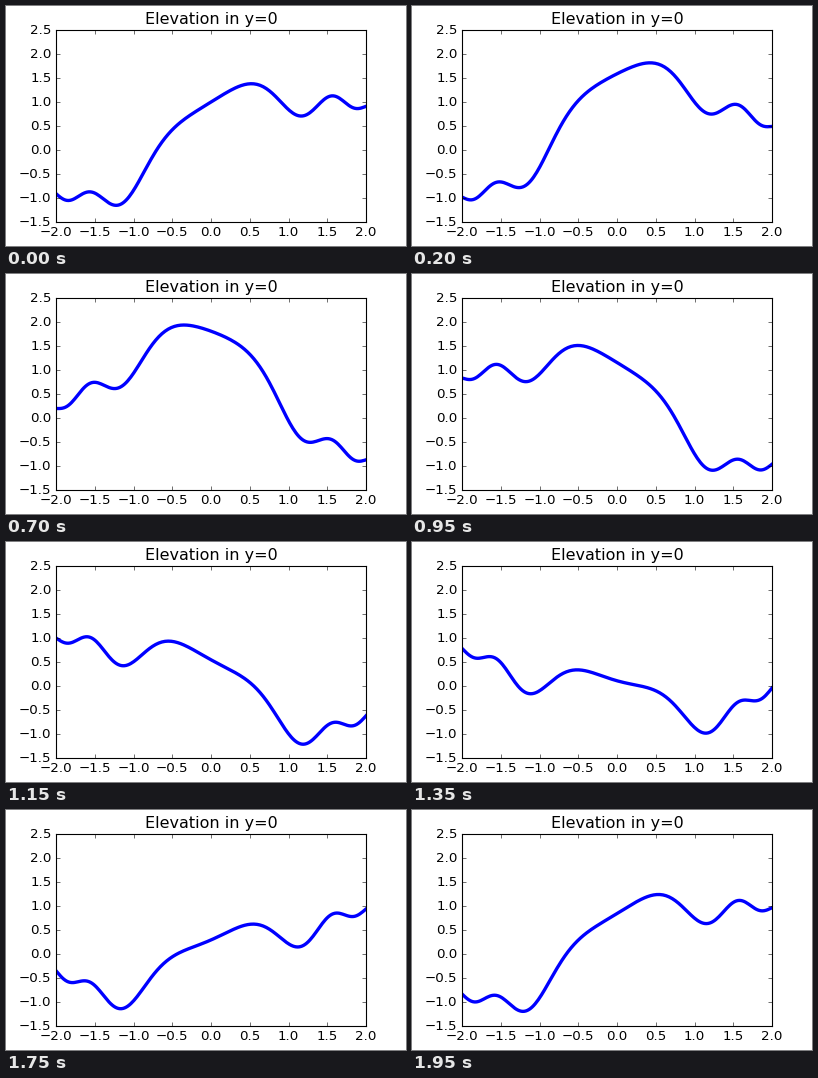
A matplotlib script for the animation above (2000 ms loop, 400 by 240 pixels).

```python
import matplotlib.pyplot as plt
import numpy as np
from matplotlib.animation import FuncAnimation

FRAMES = 40
INTERVAL = 50  # ms

plt.style.use("classic")
plt.rcParams["font.family"] = "DejaVu Sans"

x = np.linspace(-2, 2, 200)


def elevation(x, t):
    """Travelling sine wave over a fixed sinc bump."""
    return np.sin(x + t) + np.sinc(x**2)


fig, ax = plt.subplots(figsize=(5, 3), dpi=80, facecolor="white")
ax.set_xlim(-2, 2)
ax.set_ylim(-1.5, 2.5)
ax.set_xticks(np.linspace(-2, 2, 9))
ax.set_yticks(np.linspace(-1.5, 2.5, 9))
ax.set_title("Elevation in y=0")
line, = ax.plot(x, elevation(x, 0), color="blue", linewidth=3)


def update(frame):
    line.set_ydata(elevation(x, 2 * np.pi * frame / FRAMES))
    return line,


anim = FuncAnimation(fig, update, frames=FRAMES, interval=INTERVAL,
                     repeat=True, repeat_delay=0)
plt.show()
```
